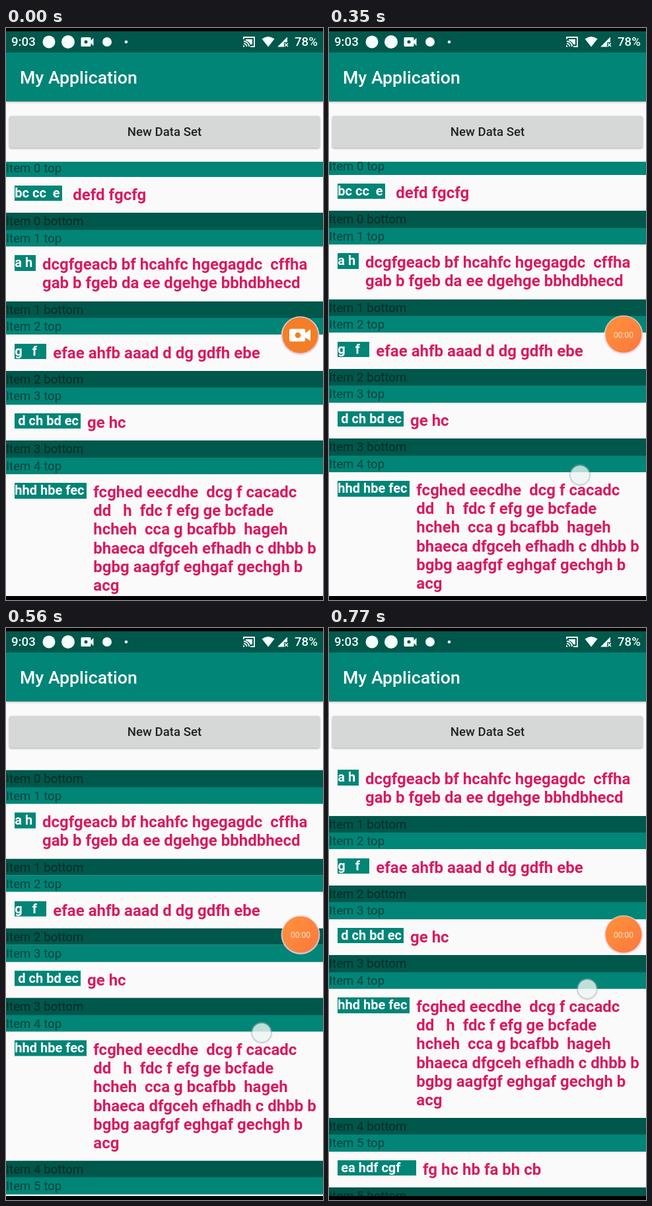
Recreate the animation shown at these times as an HTML page. Size 480 by 864 pixels, loop 840 ms.

```html
<!DOCTYPE html>
<html lang="en">
<head>
<meta charset="utf-8">
<title>My Application</title>
<style>
  html, body { margin: 0; width: 100%; height: 100%; overflow: hidden; background: #000; }
  #stage {
    position: relative; width: 480px; height: 864px; overflow: hidden;
    background: #000; font-family: Roboto, sans-serif;
  }
  #stage div, #stage svg { position: absolute; }
  #screen { left: 0; top: 5px; width: 480px; height: 852.5px; background: #fafafa; overflow: hidden; }
  #status { left: 0; top: 0; width: 480px; height: 32px; background: #00574b; }
  #status svg { left: 0; top: -5px; }
  #status div { top: 0; line-height: 32px; font-size: 18.67px; font-weight: 500; color: #f4fffc; }
  #bar {
    left: 0; top: 32px; width: 480px; height: 74px; background: #008577;
    box-shadow: 0 1px 3px rgba(0, 0, 0, .3);
    color: #fff; font-size: 26.67px; font-weight: 500; line-height: 76px; text-indent: 21px;
  }
  #button {
    left: 5px; top: 128px; width: 470px; height: 48px; border-radius: 3px; background: #d6d7d7;
    box-shadow: 0 1px 3px rgba(0, 0, 0, .35);
    text-align: center; font-size: 18.67px; font-weight: 500; line-height: 49px; color: #1f2221;
  }
  #list { left: 0; top: 197px; width: 480px; height: 656px; overflow: hidden; }
  #rows { left: 0; top: -2.7px; width: 480px; animation: scroll 840ms step-end infinite; }
  .strip {
    left: 0; width: 480px; height: 25.4px; line-height: 26px; font-size: 18.67px;
    color: rgba(0, 0, 0, .5); background: #008577;
  }
  .strip.low { background: #00574b; }
  .badge {
    left: 13.3px; height: 23.4px; line-height: 23.4px; background: #008577;
    color: #fff; font-size: 20px; font-weight: 700; white-space: pre;
  }
  .body { color: #d81b60; font-size: 24px; font-weight: 700; line-height: 28.07px; white-space: pre; }

  #bubble { left: 414px; top: 432px; }
  .idle { animation: idle 840ms step-end infinite; }
  .timer { animation: timer 840ms step-end infinite; }
  #finger {
    left: -16px; top: -16px; width: 28px; height: 28px; border: 2px solid rgba(150, 172, 170, .5);
    border-radius: 50%; background: rgba(238, 245, 243, .85); background-clip: padding-box;
    box-shadow: 0 1px 2px rgba(0, 0, 0, .12);
    animation: drag 840ms step-end infinite;
  }
  @keyframes idle { 0% { opacity: 1 } 8.33%, 100% { opacity: 0 } }
  @keyframes timer { 0% { opacity: 0 } 8.33%, 100% { opacity: 1 } }
  @keyframes scroll {
    0% { transform: translateY(0) }
    41.66% { transform: translateY(-3px) }
    50% { transform: translateY(-15px) }
    58.33% { transform: translateY(-35px) }
    66.66% { transform: translateY(-64.3px) }
    75% { transform: translateY(-90px) }
    83.33% { transform: translateY(-110px) }
    91.66%, 100% { transform: translateY(-129px) }
  }
  @keyframes drag {
    0% { opacity: 0; transform: translate(378px, 691px) }
    25% { opacity: .5; transform: translate(378px, 691px) }
    33.33% { opacity: .8; transform: translate(379px, 686px) }
    41.66% { opacity: .9; transform: translate(380px, 675px) }
    50% { opacity: .95; transform: translate(381px, 660px) }
    58.33% { opacity: .95; transform: translate(383px, 635px) }
    66.66% { opacity: .95; transform: translate(387px, 611px) }
    75% { opacity: .95; transform: translate(389px, 583px) }
    83.33% { opacity: .95; transform: translate(390px, 564px) }
    91.66%, 100% { opacity: .95; transform: translate(391px, 545px) }
  }
</style>
</head>
<body>
<div id="stage">
  <div id="screen">
    <div id="list"><div id="rows"></div></div>
    <div id="button">New Data Set</div>
    <div id="bar">My Application</div>
    <div id="status">
      <div style="left:8px">9:03</div>
      <div style="left:437px">78%</div>
      <svg width="480" height="40" fill="#f4fffc">
        <circle cx="65" cy="21" r="9.5"/>
        <circle cx="94" cy="21" r="10"/>
        <path d="M115 14h12a1.5 1.5 0 0 1 1.500 1.500v3.500l4-4v12l-4-4v3.500a1.500 1.500 0 0 1-1.500 1.500h-12a1.500 1.500 0 0 1-1.500-1.500v-11a1.500 1.500 0 0 1 1.500-1.500z"/>
        <circle cx="121" cy="21" r="2.500" fill="#00574b"/>
        <circle cx="153" cy="21" r="7"/>
        <circle cx="182" cy="21" r="2.300"/>
        <g fill="none" stroke="#f4fffc" stroke-width="1.800">
          <path d="M360 17v-3h16v14h-6M360 20a8 8 0 0 1 8 8M360 23.500a4.500 4.500 0 0 1 4.500 4.500"/>
        </g>
        <path d="M363 17h10v8h-3q-2-5-7-6zM359 26a2.500 2.500 0 0 1 2.500 2.500h-2.500z"/>
        <path d="M387.500 16.500q9.500-7 19 0L397 28.500z"/>
        <path d="M426 13.500v8h-5v7h-10z"/>
        <path d="M422 23l5 5m0-5l-5 5" stroke="#f4fffc" stroke-width="1.500"/>
      </svg>
    </div>
  </div>
  <svg id="bubble" width="64" height="64">
    <defs>
      <linearGradient id="glow" x1="0" y1="0" x2="1" y2="1">
        <stop offset="0" stop-color="#ff9238"/>
        <stop offset="1" stop-color="#fb7840"/>
      </linearGradient>
    </defs>
    <g class="idle">
      <circle cx="31.500" cy="32.500" r="29" fill="#e8c9dc"/>
      <circle cx="31.500" cy="32" r="27" fill="#f27f27"/>
      <path d="M17 22.500h20q2 0 2 2v4l8-5v17l-8-5v4q0 2-2 2h-20q-2 0-2-2v-15q0-2 2-2z" fill="#fff"/>
      <circle cx="28" cy="32" r="4.300" fill="#f27f27"/>
    </g>
    <g class="timer">
      <circle cx="32" cy="31.500" r="29.500" fill="#f1d3e6" opacity=".85"/>
      <circle cx="32" cy="31" r="27.500" fill="url(#glow)"/>
      <text x="32" y="35.500" text-anchor="middle" font-family="Roboto, sans-serif" font-size="12" fill="#ffe6cf">00:00</text>
    </g>
  </svg>
  <div id="finger"></div>
</div>
<script>
  // badge text, badge width, body lines
  const items = [
    ["bc cc  e", 72, [" defd fgcfg"]],
    ["a h", 31.7, ["dcgfgeacb bf hcahfc hgegagdc  cffha", "gab b fgeb da ee dgehge bbhdbhecd"]],
    ["g   f", 48, ["efae ahfb aaad d dg gdfh ebe"]],
    [" d ch bd ec", 99.7, ["ge hc"]],
    ["hhd hbe fec", 109, [
      "fcghed eecdhe  dcg f cacadc", "dd   h  fdc f efg ge bcfade", "hcheh  cca g bcafbb  hageh",
      "bhaeca dfgceh efhadh c dhbb b", "bgbg aagfgf eghgaf gechgh b", "acg"]],
    [" ea hdf cgf", 118.7, ["fg hc hb fa bh cb"]]
  ];
  const STRIP = 25.33, LINE = 28.07, PAD = 13.3;
  const rows = document.getElementById("rows");

  function add(name, text, y, style = {}) {
    const el = document.createElement("div");
    el.className = name;
    el.textContent = text;
    Object.assign(el.style, { top: y + "px" }, style);
    rows.append(el);
  }

  let y = 0;
  items.forEach(([tag, width, lines], i) => {
    add("strip", `Item ${i} top`, y);
    y += STRIP;
    add("badge", tag, y + PAD, { width: width + "px" });
    add("body", lines.join("\n"), y + PAD, { left: 13.3 + width + 10 + "px" });
    y += 2 * PAD + lines.length * LINE;
    add("strip low", `Item ${i} bottom`, y);
    y += STRIP;
  });
</script>
</body>
</html>
```
